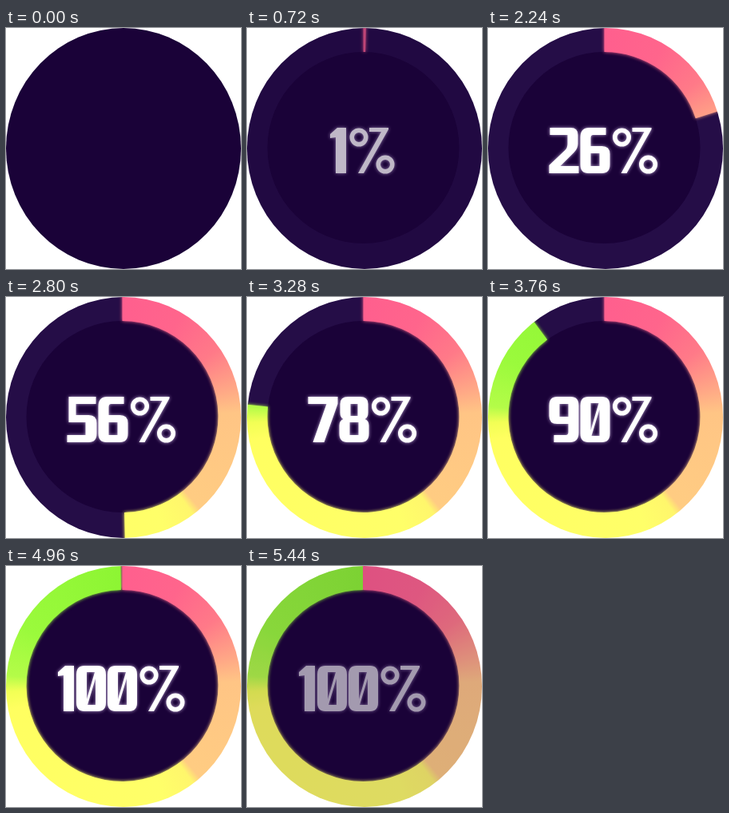
Write an HTML page with a canvas that moves like this. It is 294 px wide and 302 px high and loops after 5.52 s.

```html
<!DOCTYPE html>
<html lang="en">
<head>
<meta charset="utf-8">
<title>Progress ring</title>
<style>
  html, body { margin: 0; width: 100%; height: 100%; overflow: hidden; background: #fff; }
  canvas { display: block; width: 294px; height: 302px; }
</style>
</head>
<body>
<canvas id="stage" width="294" height="302" role="img" aria-label="Progress"></canvas>
<script>
const LOOP = 5520, STEP = 80, W = 294, H = 302;
const CX = 145.5, CY = 150, INNER = 120, OUTER = 220, TOP = -Math.PI / 2;
const ctx = document.getElementById('stage').getContext('2d');
const layer = Object.assign(document.createElement('canvas'), { width: W, height: H });
const pen = layer.getContext('2d');

// Display numerals: advance width and outline, 57 units tall.
const glyph = (advance, d) => ({ advance, path: new Path2D(d) });
const glyphs = {
  0: glyph(39, 'M10 0H27Q37 0 37 11V46Q37 57 27 57H10Q0 57 0 46V11Q0 0 10 0ZM13 8V42L23 8ZM24 16L14 49H24Z'),
  1: glyph(23, 'M0 8L9 0H20V57H7V12L0 13Z'),
  2: glyph(39, 'M1 0H27Q36 0 36 9V20Q36 26 31 31L14 48H37V57H0V47L20 28Q23 25 23 20V9H1Z'),
  3: glyph(39, 'M1 0H27Q36 0 36 9V20Q36 26 31 28Q37 30 37 36V47Q37 57 28 57H0V48H23V32H8V24H23V9H1Z'),
  4: glyph(45, 'M18 0H31L13 34H24V20H37V34H43V43H37V57H24V43H0V34Z'),
  5: glyph(39, 'M2 0H36V9H11V23H27Q37 23 37 33V46Q37 57 27 57H0V48H23V32H2Z'),
  6: glyph(39, 'M11 0H32V9H16Q13 9 13 13V23H27Q37 23 37 33V46Q37 57 27 57H10Q0 57 0 46V12Q0 0 11 0ZM13 32V48H24V32Z'),
  7: glyph(39, 'M0 0H37V9L20 57H6L23 9H0Z'),
  8: glyph(39, 'M11 0H26Q36 0 36 9V20Q36 26 32 28Q37 30 37 36V46Q37 57 27 57H10Q0 57 0 46V36Q0 30 5 28Q1 26 1 20V9Q1 0 11 0ZM14 9V24H23V9ZM13 32V48H24V32Z'),
  9: glyph(39, 'M10 0H27Q37 0 37 11V45Q37 57 26 57H6V48H21Q24 48 24 44V34H10Q0 34 0 24V11Q0 0 10 0ZM13 9V25H24V9Z'),
  '%': glyph(58, 'M26 0H50V2L19 57H12L41 5H26Z' + ring(13, 12) + ring(46, 46))
};

function ring(x, y) {
  const circle = r => `M${x - r} ${y}a${r} ${r} 0 1 0 ${2 * r} 0a${r} ${r} 0 1 0 ${-2 * r} 0Z`;
  return circle(11.5) + circle(6);
}

const clamp = v => Math.min(1, Math.max(0, v));

// Cubic Bezier easing with flat ends; x1 and x2 are the handle positions in time.
function ease(x, x1, x2) {
  let lo = 0, hi = 1;
  for (let i = 0; i < 30; i++) {
    const s = (lo + hi) / 2, r = 1 - s;
    if (3 * r * r * s * x1 + 3 * r * s * s * x2 + s ** 3 < x) lo = s; else hi = s;
  }
  return lo * lo * (3 - 2 * lo);
}

const rainbow = pen.createConicGradient(TOP, CX, CY);
[[0, '#ff5f8e'], [30, '#ff658c'], [55, '#ff7a88'], [76, '#ffa886'], [88, '#ffc585'],
 [140, '#ffcc82'], [144, '#fff66c'], [160, '#ffff69'], [258, '#ffff60'],
 [267, '#f2ff55'], [275, '#b4fc48'], [300, '#9bfa3c'], [360, '#8df533']]
  .forEach(([deg, color]) => rainbow.addColorStop(deg / 360, color));

// Draws on a separate layer so that glow and shape fade together.
function fade(alpha, draw) {
  pen.clearRect(0, 0, W, H);
  pen.save();
  draw();
  pen.restore();
  ctx.globalAlpha = alpha;
  ctx.drawImage(layer, 0, 0);
  ctx.globalAlpha = 1;
}

function band(fraction) {
  const end = TOP + fraction * 2 * Math.PI;
  pen.beginPath();
  pen.arc(CX, CY, OUTER, TOP, end);
  pen.arc(CX, CY, INNER, end, TOP, true);
  pen.closePath();
}

function drawRing(fraction) {
  pen.fillStyle = '#250d47';
  band(1);
  pen.fill();
  if (fraction <= 0) return;
  pen.fillStyle = rainbow;
  band(fraction);
  pen.filter = 'blur(2px)';
  pen.fill();
  pen.filter = 'none';
  pen.fill();
}

function drawLabel(text) {
  const chars = [...text].map(c => glyphs[c]);
  const width = chars.reduce((sum, g) => sum + g.advance, 0);
  pen.fillStyle = '#fff';
  pen.shadowColor = 'rgba(235,215,255,.75)';
  pen.shadowBlur = 4;
  pen.translate(144.5 - width / 2, 125);
  for (const g of chars) {
    pen.fill(g.path, 'evenodd');
    pen.translate(g.advance, 0);
  }
}

function render(time) {
  const progress = clamp((time - 385) / 4840);
  const fadeIn = clamp(time / 1000);
  const fadeOut = clamp((time - 5040) / 400);
  const label = Math.ceil(100 * ease(progress, 0.62, 0.326) - 1e-4) + '%';

  ctx.fillStyle = '#1a0238';
  ctx.fillRect(0, 0, W, H);
  fade(fadeIn * (1 - 0.14 * fadeOut), () => drawRing(ease(progress, 0.7, 0.3)));
  fade(fadeIn * (1 - 0.4 * fadeOut), () => drawLabel(label));

  ctx.globalCompositeOperation = 'destination-in';
  ctx.beginPath();
  ctx.ellipse(W / 2, H / 2, W / 2, H / 2, 0, 0, 2 * Math.PI);
  ctx.fill();
  ctx.globalCompositeOperation = 'source-over';
}

const start = performance.now();
function tick() {
  const time = (performance.now() - start) % LOOP;
  render(Math.floor(time / STEP) * STEP);
  requestAnimationFrame(tick);
}
tick();
</script>
</body>
</html>
```
